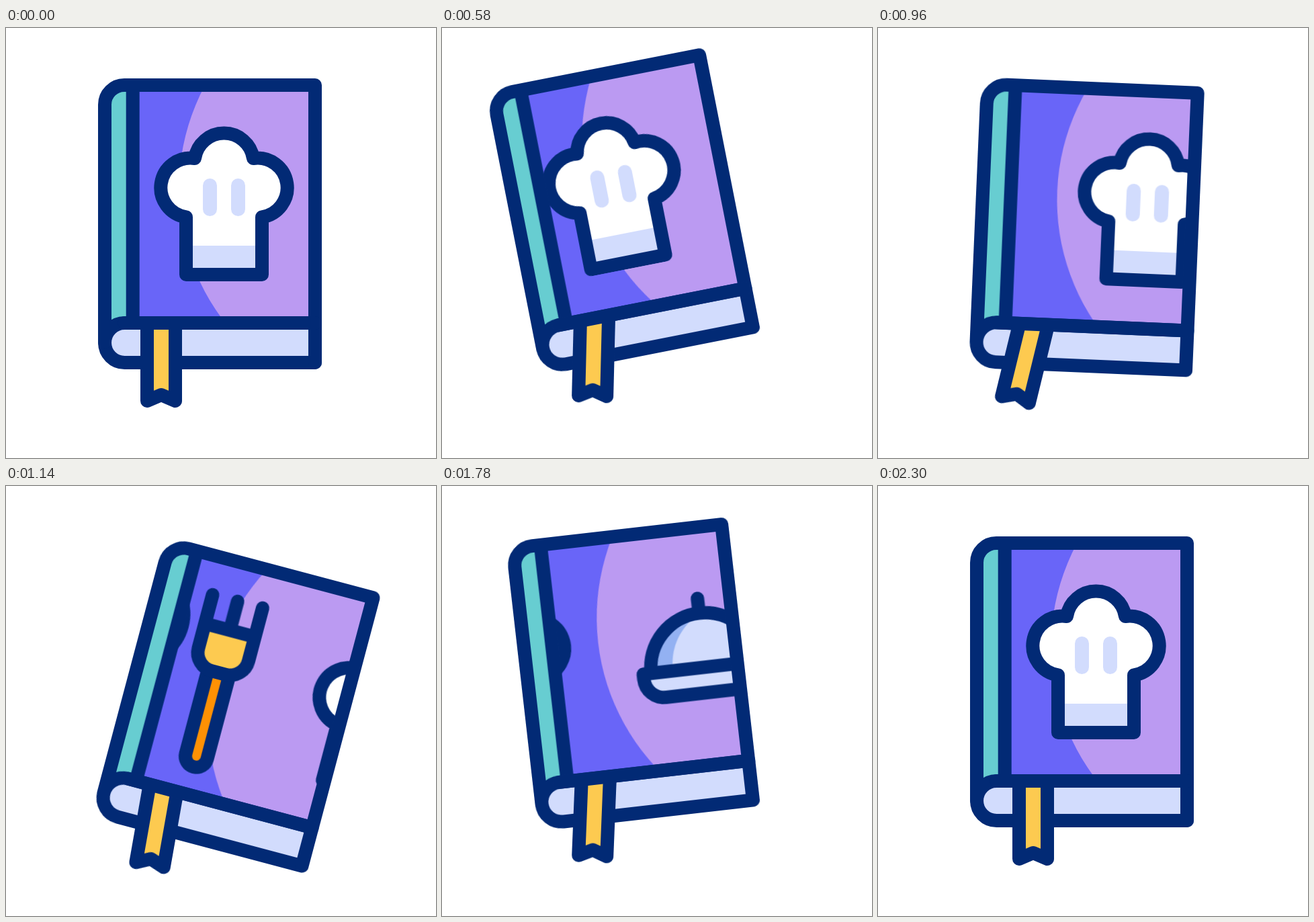
Animation, 640 px wide and 640 px high, one loop 2.4 s. Source, as an HTML page:

```html
<!DOCTYPE html>
<html lang="en">
<head>
<meta charset="utf-8">
<title>Cookbook</title>
<style>
  html, body { margin: 0; width: 100%; height: 100%; overflow: hidden; background: #fff; }
  svg { display: block; width: 100%; height: 100%; }

  .ink { stroke: #022a75; stroke-width: 20; stroke-linecap: round; stroke-linejoin: round; }
  .line { fill: none; }
  .white { fill: #fff; }
  .pale { fill: #d2dcfd; }
  .shade { fill: #93b1f2; }
  .gold { fill: #fdca50; }
  .orange { fill: #ff9104; }
  .teal { fill: #67cdd1; }
  .violet { fill: #6965f8; }
  .lilac { fill: #bb9af2; }
  .slit { stroke: #d2dcfd; stroke-width: 21; stroke-linecap: round; }

  .book, .ribbon, .strip { animation: 2400ms infinite cubic-bezier(.333, 0, .667, 1); }
  .book { transform-origin: 192px 457px; animation-name: rock; }
  .ribbon { transform-origin: 231px 440px; stroke-linecap: butt; animation-name: swing; }
  .strip { animation-name: slide; }

  @keyframes rock {
    0%, 8.3333% { transform: rotate(0deg); }
    29.1667% { transform: rotate(-13deg); }
    50% { transform: rotate(16deg); }
    70.8333% { transform: rotate(-7deg); }
    91.6667%, 100% { transform: rotate(0deg); }
  }
  /* the ribbon trails behind the book */
  @keyframes swing {
    0%, 8.3333% { transform: rotate(0deg); }
    33.3333% { transform: rotate(18deg); }
    58.3333% { transform: rotate(-20deg); }
    75% { transform: rotate(9deg); }
    95.8333%, 100% { transform: rotate(0deg); }
  }
  /* a small pull to the left, then one long glide to the right */
  @keyframes slide {
    0% { transform: translateX(0); }
    8.3333% { transform: translateX(0); animation-timing-function: cubic-bezier(.333, .212, .667, .665); }
    15.8333% { transform: translateX(-17px); animation-timing-function: cubic-bezier(.333, .518, .667, 1); }
    23.3333% { transform: translateX(-28px); animation-timing-function: cubic-bezier(.333, 0, .667, .055); }
    32.5% { transform: translateX(-8.6px); animation-timing-function: cubic-bezier(.333, .153, .667, .542); }
    47.5% { transform: translateX(188px); animation-timing-function: cubic-bezier(.333, .31, .667, .665); }
    60.8333% { transform: translateX(446.5px); animation-timing-function: cubic-bezier(.333, .34, .667, .672); }
    74.1667% { transform: translateX(700.5px); animation-timing-function: cubic-bezier(.333, .635, .667, 1); }
    95.8333%, 100% { transform: translateX(913px); }
  }
</style>
</head>
<body>
<svg viewBox="0 0 640 640">
  <defs>
    <clipPath id="cover"><rect x="189" y="85" width="271" height="354"/></clipPath>

    <g id="hat">
      <path class="ink white" d="M-56.5 367V281.4A44 44 0 0 1-43.5 194A44 44 0 0 1 43.5 194A44 44 0 0 1 56.5 281.4V367Z"/>
      <rect class="pale" x="-46.5" y="324" width="93" height="33"/>
      <path class="slit" d="M-21 234.5V269.5M21 234.5V269.5"/>
    </g>

    <g id="fork">
      <path class="ink orange" d="M-16.5 252V380.6a16.5 16.5 0 0 0 33 0V252"/>
      <path class="gold" d="M-38.5 186.5V224a28 28 0 0 0 28 28H10.5a28 28 0 0 0 28-28V186.5Z"/>
      <path class="ink line" d="M-38.5 142V224a28 28 0 0 0 28 28H10.5a28 28 0 0 0 28-28V142M0 142V186.5M-38.5 186.5H38.5"/>
    </g>

    <g id="spoon">
      <path class="ink gold" d="M-16.5 254V381a16.5 16.5 0 0 0 33 0V254"/>
      <ellipse class="ink gold" cy="198.8" rx="44" ry="56"/>
    </g>

    <g id="cloche">
      <path class="shade" d="M-81 293.5a81 81 0 0 1 162 0Z"/>
      <path class="pale" d="M-48.5 294C-48.5 262-34 236-8 218L0 212.5A81 81 0 0 1 81 293.5Z"/>
      <path class="ink line" d="M-81 293.5a81 81 0 0 1 162 0M0 190.5V212"/>
      <path class="ink pale" d="M-92.8 293.5H92.8V301.5a30 30 0 0 1-30 30H-62.8a30 30 0 0 1-30-30Z"/>
    </g>
  </defs>

  <g class="book">
    <path class="teal" d="M189 85H176A29 29 0 0 0 147 114V468A29 29 0 0 1 176 439H189Z"/>
    <g clip-path="url(#cover)">
      <rect class="violet" x="189" y="85" width="271" height="354"/>
      <circle class="lilac" cx="582.5" cy="239" r="325"/>
      <g class="strip">
        <use href="#hat" x="324.5"/>
        <use href="#fork" x="77.5"/>
        <use href="#spoon" x="-37"/>
        <use href="#cloche" x="-289.5"/>
        <use href="#hat" x="-588.5"/>
      </g>
    </g>
    <path class="ink pale" d="M460 439H176.5a29.5 29.5 0 0 0 0 59H460Z"/>
    <path class="ink line" d="M460 498V85H176A29 29 0 0 0 147 114V468M188.7 85V439"/>
    <path class="ink gold ribbon" d="M210 439V555L231 546L252 555V439"/>
    <path class="ink line" d="M176.5 439H460"/>
  </g>
</svg>
</body>
</html>
```
